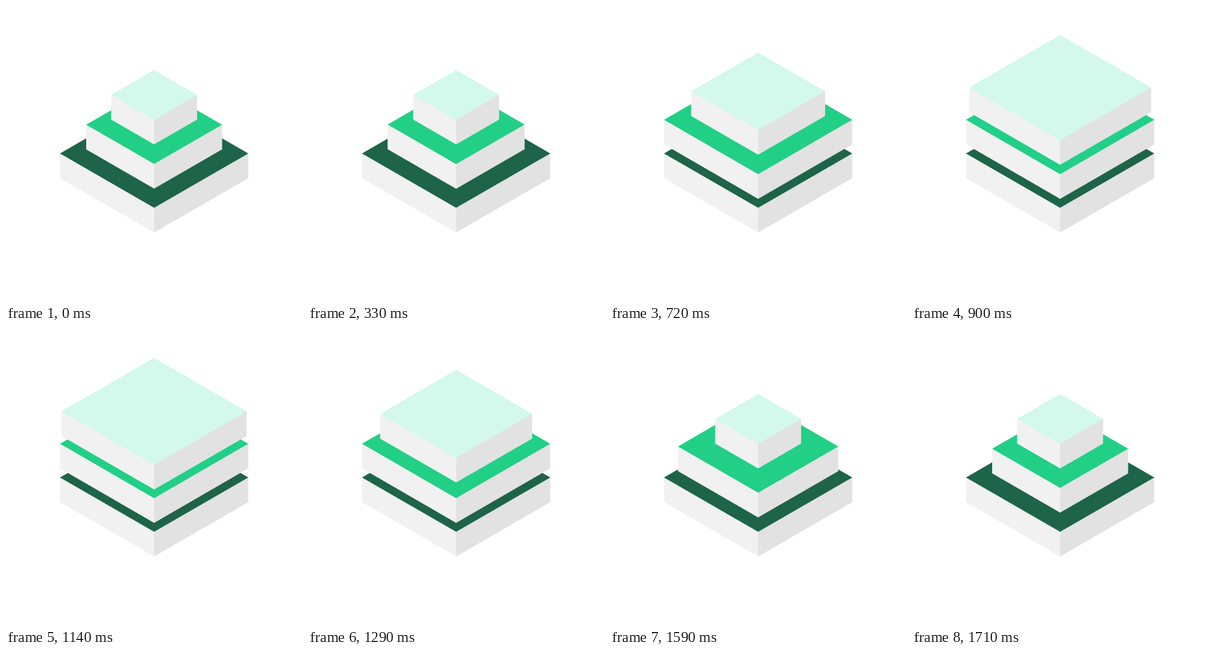
Write an HTML page that moves like this. It is 432 px wide and 432 px high and loops after 5.07 s.

```html
<!DOCTYPE html>
<html lang="en">
<head>
<meta charset="utf-8">
<title>Stacked blocks</title>
<style>
  html, body { margin: 0; width: 100%; height: 100%; overflow: hidden; background: #fff; }
  svg { display: block; width: 100%; height: 100%; }
</style>
</head>
<body>
<svg id="stage" viewBox="0 0 432 432"></svg>
<script>
const LOOP = 5070, STEP = 30;
const CX = 216.2, DEPTH = 36, SLOPE = Math.tan(Math.PI / 6);
const WIDE = 137.4;

// Each block blends from its small pose to its wide pose and back.
const blocks = [
  { color: '#1d6449', half: [WIDE, WIDE], y: [215.2, 215.2] },
  { color: '#22cf86', half: [99.2, WIDE], y: [173.2, 166.1], grow: [300, 750], shrink: [1460, 1710] },
  { color: '#d2f9eb', half: [62.7, WIDE], y: [129.8, 118.4], grow: [600, 1050], shrink: [1075, 1595] }
];

const stage = document.getElementById('stage');

function addFace(color) {
  const face = document.createElementNS('http://www.w3.org/2000/svg', 'polygon');
  face.setAttribute('fill', color);
  stage.appendChild(face);
  return face;
}

for (const block of blocks) {
  block.right = addFace('#e2e2e2');
  block.left = addFace('#f1f1f1');
  block.top = addFace(block.color);
}

// Cubic bezier easing with end handles at (x1, 0) and (x2, 1).
function bezier(x1, x2) {
  return x => {
    if (x <= 0) return 0;
    if (x >= 1) return 1;
    let lo = 0, hi = 1;
    for (let i = 0; i < 30; i++) {
      const u = (lo + hi) / 2, v = 1 - u;
      if (3 * v * v * u * x1 + 3 * v * u * u * x2 + u * u * u < x) lo = u;
      else hi = u;
    }
    return lo * lo * (3 - 2 * lo);
  };
}

const easeGrow = bezier(0.3, 0.11);
const easeShrink = bezier(0.42, 0.58);
const mix = ([a, b], k) => a + (b - a) * k;
const progress = (t, [start, end]) => (t - start) / (end - start);

function spread(block, t) {
  if (!block.grow) return 0;
  return easeGrow(progress(t, block.grow)) - easeShrink(progress(t, block.shrink));
}

function setPoints(face, ...points) {
  face.setAttribute('points', points.map(p => p.map(n => n.toFixed(2)).join()).join(' '));
}

function drawBlock(block, t) {
  const k = spread(block, t);
  const w = mix(block.half, k), y = mix(block.y, k), h = w * SLOPE;
  const l = CX - w, r = CX + w, low = y + h + DEPTH;
  const seam = CX - 0.5;
  setPoints(block.right, [seam, y], [r, y], [r, y + DEPTH], [CX, low], [seam, low - 0.5 * SLOPE]);
  setPoints(block.left, [l, y], [CX, y], [CX, low], [l, y + DEPTH]);
  setPoints(block.top, [l, y], [CX, y - h], [r, y], [CX, y + h]);
}

function render(t) {
  for (const block of blocks) drawBlock(block, t);
}

const begin = performance.now();
function tick() {
  const t = (performance.now() - begin) % LOOP;
  render(Math.floor(t / STEP) * STEP);
  requestAnimationFrame(tick);
}
tick();
</script>
</body>
</html>
```
